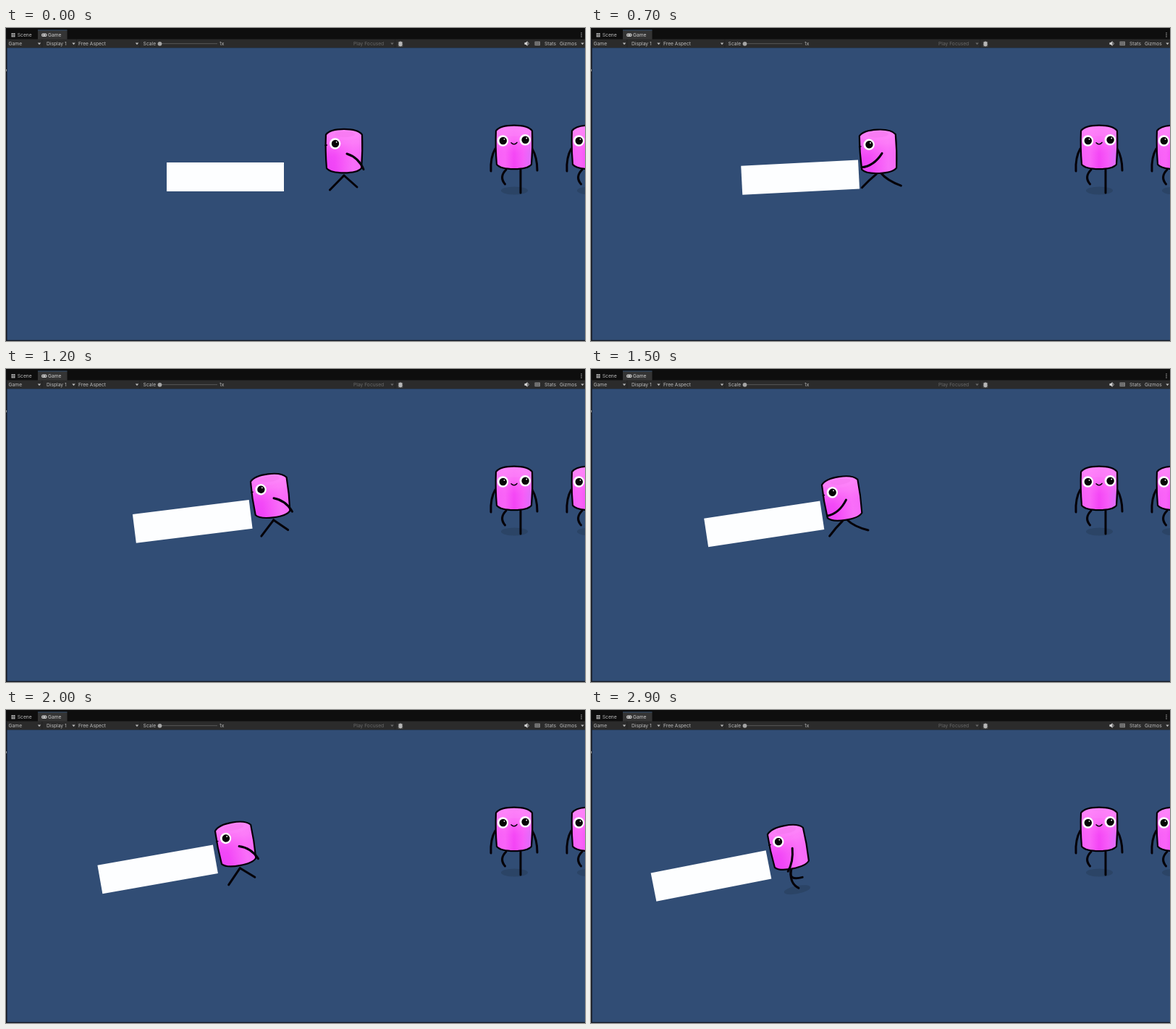
Write an HTML page with a canvas that moves like this. It is 800 px wide and 433 px high and loops after 3 s.

```html
<!DOCTYPE html>
<html lang="en">
<head>
<meta charset="utf-8">
<title>Pushing a block</title>
<style>
html, body { margin: 0; width: 100%; height: 100%; overflow: hidden; background: #314d75; }
canvas { display: block; width: 100vw; height: 100vh; }
</style>
</head>
<body>
<canvas id="stage" width="800" height="433"></canvas>
<script>
const ctx = document.getElementById('stage').getContext('2d');
const LOOP = 3000, STEP = 100, POSE_TIME = 250;
const CONTACT = 0.48, WALK_SPEED = 120, PUSH_SPEED = 63;
const INK = '#050008';
const LIFT = 5.3;

// Pushing slows down while the block tips towards its final tilt
function motionAt(seconds) {
  const s = Math.max(0, seconds - CONTACT);
  const pushed = PUSH_SPEED * s - 0.45 * s ** 4;
  const tilt = -0.2025 * (1 - Math.exp(-s / 0.76));
  const drop = -0.87 * pushed * Math.tan(tilt);
  const blockX = 303 - pushed;
  return {
    tilt,
    block: { x: blockX, y: 206 + drop },
    walker: { x: Math.max(467 - WALK_SPEED * seconds, blockX + 107.8), y: 170 + 1.06 * drop }
  };
}

function placed(x, y, angle, draw) {
  ctx.save();
  ctx.translate(x, y);
  ctx.rotate(angle);
  draw();
  ctx.restore();
}

function dot(x, y, rx, color, ry = rx) {
  ctx.fillStyle = color;
  ctx.beginPath();
  ctx.ellipse(x, y, rx, ry, 0, 0, Math.PI * 2);
  ctx.fill();
}

function rect(x, y, w, h, color) {
  ctx.fillStyle = color;
  ctx.fillRect(x, y, w, h);
}

// One bent stroke from a to b, pulled towards the point between them
function limb(ax, ay, bendX, bendY, bx, by, width = 3, color = INK) {
  ctx.beginPath();
  ctx.moveTo(ax, ay);
  ctx.quadraticCurveTo(bendX, bendY, bx, by);
  ctx.lineCap = 'round';
  ctx.lineWidth = width;
  ctx.strokeStyle = color;
  ctx.stroke();
}

const bone = (ax, ay, bx, by) => limb(ax, ay, ax, ay, bx, by);

function gradient(x0, y0, x1, y1, ...colors) {
  const g = ctx.createLinearGradient(x0, y0, x1, y1);
  colors.forEach((c, i) => g.addColorStop(i / (colors.length - 1), c));
  return g;
}

function bodyPath() {
  const top = -22.5, bottom = 24, wide = 25, narrow = 24;
  ctx.beginPath();
  ctx.moveTo(-wide, top);
  ctx.bezierCurveTo(-17, -32.6, 17, -32.6, wide, top);
  ctx.quadraticCurveTo(wide + 1, 0, narrow, bottom);
  ctx.bezierCurveTo(17, 32.5, -17, 32.5, -narrow, bottom);
  ctx.quadraticCurveTo(-wide - 1, 0, -wide, top);
  ctx.closePath();
}

function body(front) {
  ctx.save();
  bodyPath();
  ctx.fillStyle = front
    ? gradient(-25, 0, 25, 0, '#f660f7', '#f964f8', '#f343f5', '#f65cf8', '#d872fb')
    : gradient(-25, 0, 25, 0, '#ec42f6', '#f145f7', '#f65bf8', '#f870f9', '#f56af9');
  ctx.fill();
  ctx.clip();
  rect(-27, -32, 54, 64, gradient(0, -30, 0, 28, '#ff8af8dd', '#ff82f8aa', '#ff60f622', '#ff50f500'));
  dot(0, -22, 23, '#fd86f855', 7);
  if (!front) dot(1, -23, 14, '#f377ef88', 4);
  ctx.restore();
  bodyPath();
  ctx.lineJoin = 'round';
  ctx.lineWidth = 2.2;
  ctx.strokeStyle = INK;
  ctx.stroke();
}

function eye(x, y) {
  dot(x, y, 7.7, '#fff');
  dot(x + 0.3, y, 5.2, '#050505');
  dot(x + 2, y - 2.2, 0.9, '#fff');
}

const shadow = () => dot(0.5, 55, 18.5, '#2b4466', 5.5);

function sideBody(lift) {
  placed(0, -lift, 0, () => {
    body(false);
    limb(-26, -7.5, -25, -8, -23.5, -8, 1.4);
    eye(-12.3, -10);
  });
}

// The four drawings of the walk, relative to the body at its lowest
const poses = [
  function strideArmBack() {
    bone(0, 34, -19.5, 54);
    bone(0, 34, 18, 50);
    sideBody(0);
    limb(4, 4, 20, 9, 27, 25.5);
  },
  function passArmBent() {
    shadow();
    bone(-4, 26, -3, 54);
    limb(2, 27, -21, 40, 8, 42);
    sideBody(LIFT);
    limb(5, -1, 20, 19, -5, 23);
  },
  function strideArmForward() {
    limb(-4, 31, -15, 39, -25, 49);
    limb(2, 30, 10, 41, 29, 49);
    sideBody(0);
    limb(5, 3, -7, 20, -24, 21);
  },
  function passArmDown() {
    shadow();
    limb(-2, 26, -10, 41, 11, 39.4);
    limb(-3, 27, -8, 45, 3, 53);
    sideBody(LIFT);
    limb(5, -2.6, 3, 16, -7, 27.5);
  }
];

function bystander() {
  shadow();
  limb(-11, 26, -21, 36, -12.5, 46);
  bone(9, 26, 9, 58);
  limb(-26, -3, -33, 9, -32, 28);
  limb(25, -3, 32, 9, 32, 27);
  placed(0, -LIFT, 0, () => {
    body(true);
    eye(-15.5, -8.7);
    eye(15.3, -10);
    limb(-4, -6, 0, -1.8, 4, -6.3, 1.5);
  });
}

function label(text, x, y = 24, color = '#bdbdbd') {
  ctx.font = '6.7px Inter, Roboto, sans-serif';
  ctx.fillStyle = color;
  ctx.fillText(text, x, y);
}

function triangle(x, y, w, h, color) {
  ctx.fillStyle = color;
  ctx.beginPath();
  ctx.moveTo(x - w / 2, y);
  ctx.lineTo(x + w / 2, y);
  ctx.lineTo(x, y + h);
  ctx.fill();
}

function menu(text, x, arrowX, color = '#bdbdbd') {
  label(text, x, 24, color);
  triangle(arrowX, 20.5, 4.4, 2.7, color);
  rect(arrowX + 3.5, 16, 0.7, 11, '#202020');
}

function tabs() {
  rect(0, 0, 800, 16, '#0e0e0e');
  rect(44, 3, 40.5, 13, '#343434');
  rect(44, 2.5, 40.5, 1, '#35506e');
  rect(7.5, 7, 5, 5.5, '#aaa');
  rect(9.7, 7, 0.6, 5.5, '#222');
  rect(7.5, 9.4, 5, 0.6, '#222');
  label('Scene', 15.8, 12.2);
  ctx.fillStyle = '#c5c5c5';
  ctx.beginPath();
  ctx.roundRect(49, 7.5, 7.5, 4.6, 2);
  ctx.fill();
  dot(51, 9.7, 0.8, '#343434');
  dot(54.5, 9.7, 0.8, '#343434');
  label('Game', 58, 12.2, '#cfcfcf');
  for (let y = 7; y <= 12; y += 2.5) dot(795, y, 0.7, '#c4c4c4');
}

function toolbar() {
  rect(0, 15.5, 800, 11.5, '#2b2b2b');
  rect(0, 27, 800, 1, '#26364c');
  menu('Game', 3.6, 46);
  menu('Display 1', 56, 93.5);
  menu('Free Aspect', 100, 181);
  label('Scale', 189.6);
  rect(212, 21.3, 80, 0.8, '#606060');
  dot(212.5, 21.8, 2.9, '#a5a5a5');
  label('1x', 295);
  menu('Play Focused', 480, 533.5, '#696969');
  label('Stats', 744);
  menu('Gizmos', 765, 796.5);

  // Bug, speaker and keyboard
  dot(545, 22, 2.6, '#bbb', 3.4);
  for (let y = 19.5; y < 25; y += 2.5) rect(541.7, y, 6.6, 0.7, '#aaa');
  rect(716.5, 20, 2.5, 3, '#d0d0d0');
  placed(720.5, 21.5, Math.PI / 2, () => triangle(0, 0, 7, 4, '#d0d0d0'));
  limb(721.5, 19.8, 723.5, 21.5, 721.5, 23.2, 0.8, '#d0d0d0');
  rect(730.5, 18.7, 7.5, 5.5, '#898989');
  for (let y = 20; y < 23; y += 2) rect(731.2, y, 6, 0.7, '#3c3c3c');
}

function draw(t) {
  const { tilt, block, walker } = motionAt(t / 1000);
  rect(0, 0, 800, 433, '#314d75');
  placed(block.x, block.y, tilt, () => rect(-81, -20, 162, 40, '#fdfeff'));
  placed(walker.x, walker.y, tilt, poses[Math.floor(t / POSE_TIME) % poses.length]);
  for (let x = 702; x < 830; x += 105) placed(x, 170, 0, bystander);
  tabs();
  toolbar();
  rect(0, 16, 1.5, 417, '#15171c');
  rect(0, 57, 1, 3, '#888');
  rect(0, 431.7, 800, 1.3, '#171b24');
}

const start = performance.now();
function tick() {
  const elapsed = (performance.now() - start) % LOOP;
  draw(Math.floor(elapsed / STEP) * STEP);
  requestAnimationFrame(tick);
}
tick();
</script>
</body>
</html>
```
